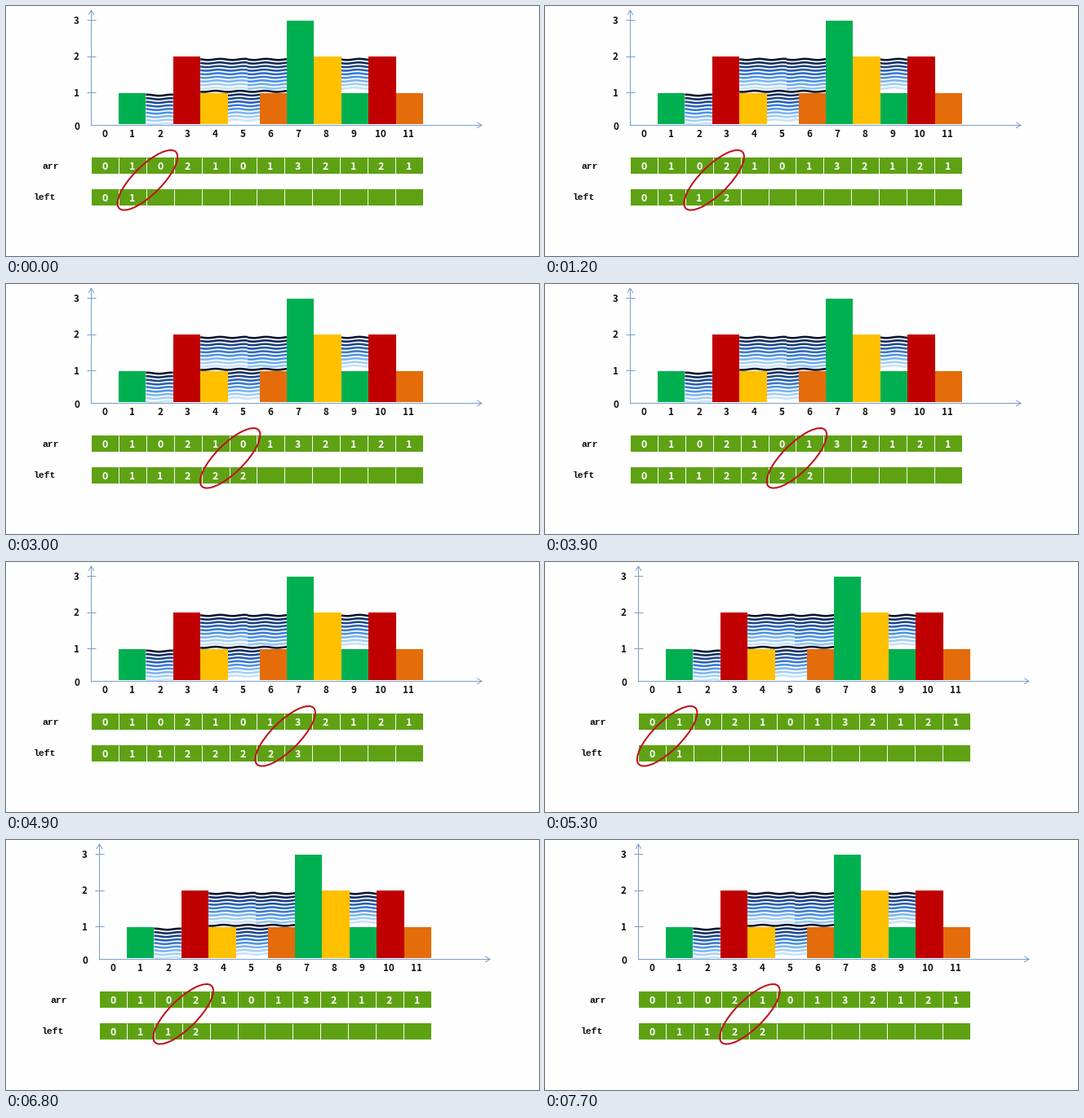
Write a matplotlib script that moves like this. It is 653 px wide and 307 px high and loops after 8000 ms.

```python
import numpy as np
import matplotlib.pyplot as plt
from matplotlib.animation import FuncAnimation
from matplotlib.colors import LinearSegmentedColormap
from matplotlib.patches import Ellipse, Rectangle

W, H, DPI = 653, 307, 100
PX = 72 / DPI
STEP, LOOP = 100, 8000

HEIGHTS = [0, 1, 0, 2, 1, 0, 1, 3, 2, 1, 2, 1]
LEFT_MAX = np.maximum.accumulate(HEIGHTS)
LEVEL_Y = [145, 107, 62.3, 18]
X0, CELL, BAR_W = 105, 33.83, 33.4
ARR_Y, LEFT_Y = 186, 225

GREEN, RED, YELLOW, ORANGE = "#00B050", "#C00000", "#FFC000", "#E46C0A"
BARS = {1: GREEN, 3: RED, 4: YELLOW, 6: ORANGE, 7: GREEN,
        8: YELLOW, 9: GREEN, 10: RED, 11: ORANGE}
ROW, AXIS, INK, PAPER = "#5EA214", "#7BA0CB", "#111111", "#FEFEFE"
SEA = LinearSegmentedColormap.from_list(
    "sea", ["#0A1730", "#1B3F80", "#2B66C0", "#468CE0", "#8CC2F4", "#C8E3FA"])

# Times in ms at which a cell is filled or the ring moves on
RESTART = 5300
FILLS = np.array([300, 1200, 2100, 3000, 3900, 4900])
MOVES = np.array([700, 1600, 2500, 3500, 4400])
FILLS_2 = np.array([5900, 6800, 7700])
MOVES_2 = np.array([5400, 6300, 7200])

fig = plt.figure(figsize=(W / DPI, H / DPI), dpi=DPI, facecolor=PAPER)
ax = fig.add_axes([0, 0, 1, 1])
ax.set_xlim(0, W)
ax.set_ylim(H, 0)
ax.axis("off")


def cell_x(i):
    return X0 + CELL * i


def bar_x(i):
    # The pit at 5 is wider than a bar
    return 104.6 + BAR_W * i + (5.6 if i > 5 else 0)


def line(xs, ys, color=AXIS, width=1.0, z=1):
    ax.plot(xs, ys, color=color, lw=width * PX, zorder=z,
            solid_capstyle="butt", solid_joinstyle="miter")


def box(x, y, w, h, color, z):
    ax.add_patch(Rectangle((x, y), w, h, fc=color, ec="none", zorder=z))


def label(x, y, s, size, color=INK, **kw):
    opts = dict(ha="center", va="baseline", weight="bold")
    opts.update(kw)
    return ax.text(x, y, s, fontsize=size * PX, color=color, zorder=6, **opts)


def number(x, y, v, size=11.6, color=INK):
    """Digits centred on (x, y)."""
    return label(x, y + 0.365 * size, str(v), size, color,
                 family="Noto Sans CJK JP")


def water(x0, x1, top, phase=0.0, deep=0.0, n=9, gap=4.4):
    xs = np.linspace(x0, x1, 80)
    for j in range(n):
        u = j / (n - 1)
        ys = top + gap * j + 0.7 * np.sin(2 * np.pi * xs / 30 + phase + 0.15 * j)
        line(xs, ys, SEA(u * (1 - deep)), 2.6, z=2)


def draw_chart():
    water(bar_x(2), bar_x(3), 109.5)
    water(bar_x(4), 296, 65.6)
    water(296, bar_x(7), 65.6, 0.8, deep=0.18)
    water(bar_x(9), bar_x(10), 65.6, 2.0)
    box(bar_x(4), 103, bar_x(7) - bar_x(4), 42, PAPER, 1.5)
    water(bar_x(4), bar_x(7), 104.8, 1.2)

    for i, color in BARS.items():
        top = LEVEL_Y[HEIGHTS[i]]
        box(bar_x(i), top, BAR_W, LEVEL_Y[0] - top, color, 3)

    axis_x, axis_y = 104.4, 146.4
    line([axis_x] * 2, [147, 5])
    line(axis_x + np.array([-3.5, 0, 3.5]), [11, 5, 11])
    line([axis_x, 583], [axis_y] * 2, z=4)
    line([577, 583, 577], axis_y + np.array([-3.5, 0, 3.5]), z=4)
    for y in LEVEL_Y[1:]:
        line([99, 110], [y - 0.6] * 2)
    for v, y in enumerate([147.5, 107, 62, 17.5]):
        number(86.5, y, v)
    for i in range(len(HEIGHTS)):
        number(cell_x(i) + 16, 156.5, i)


def draw_row(y, values):
    box(X0, y, CELL * len(values), 20, ROW, 3)
    for i in range(1, len(values)):
        line([cell_x(i) - 0.6] * 2, [y, y + 20], "#F4F8EE", z=4)
    return [number(cell_x(i) + 16, y + 10, v, 12.4, "white")
            for i, v in enumerate(values)]


draw_chart()
draw_row(ARR_Y, HEIGHTS)
left_digits = draw_row(LEFT_Y, LEFT_MAX)
for x, y, name in [(44.3, 200.5, "arr"), (33.8, 237.6, "left")]:
    label(x, y, name, 11.5, ha="left", family="Liberation Mono")

ring = Ellipse((0, 214), 98, 35, angle=-45, fc="none", ec="#C0101C",
               lw=2 * PX, zorder=7)
ax.add_patch(ring)


def update(i):
    t = i * STEP
    if t < RESTART:
        shift, pos, fills, moves = 0, 2, FILLS, MOVES
    else:
        shift, pos, fills, moves = 10, 1, FILLS_2, MOVES_2
    pos += int(np.sum(t >= moves))
    filled = 2 + int(np.sum(t >= fills))

    ax.set_xlim(-shift, W - shift)
    ring.set_center((105.9 + 33.75 * pos, 213.8))
    for k, digit in enumerate(left_digits):
        digit.set_visible(k < filled)
    return [ring, *left_digits]


anim = FuncAnimation(fig, update, frames=LOOP // STEP, interval=STEP,
                     repeat=True, repeat_delay=0, blit=False)
plt.show()
```
